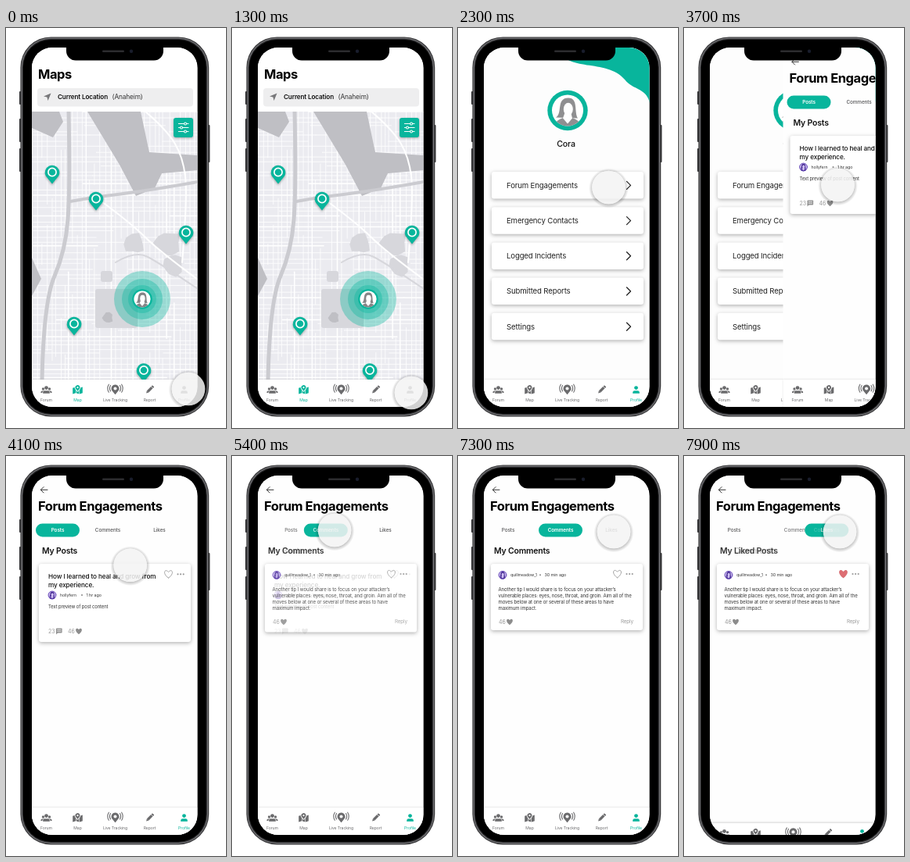
Write an HTML page with a canvas that moves like this. It is 281 px wide and 512 px high and loops after 8000 ms.

```html
<!DOCTYPE html>
<html lang="en">
<head>
<meta charset="utf-8">
<title>Safety app walkthrough</title>
<style>
html, body { margin: 0; width: 100%; height: 100%; overflow: hidden; background: #fff; }
canvas { display: block; width: 281px; height: 512px; }
</style>
</head>
<body>
<canvas id="stage"></canvas>
<script>
const W = 281, H = 512, LOOP = 8000;
const GREEN = '#08b59c', GRAY = '#6b6b6d', PALE = '#999', INK = '#111', BODY = '#333';
const FONT = 'Inter, "Liberation Sans", sans-serif';
const LEFT = 33, TOP = 25, WIDE = 211.5, TALL = 460, MAP_TOP = 107, BAR_TOP = 450;
const dpr = Math.max(1, window.devicePixelRatio || 1);

function prepare(canvas) {
  canvas.width = W * dpr;
  canvas.height = H * dpr;
  const g = canvas.getContext('2d');
  g.scale(dpr, dpr);
  return g;
}
const main = prepare(document.getElementById('stage'));
let c = main;

// ---- helpers ----
const mix = (a, b, p) => a + (b - a) * p;
const span = (t, a, length) => Math.max(0, Math.min(1, (t - a) / length));
const smooth = p => p * p * (3 - 2 * p);
const easeOut = p => 1 - (1 - p) * (1 - p);

let seed = 11;
function rand(a = 0, b = 1) {
  seed = (seed * 16807) % 2147483647;
  return mix(a, b, seed / 2147483647);
}

function scoped(draw) { c.save(); draw(); c.restore(); }
function fade(alpha, draw) {
  if (alpha <= 0) return;
  scoped(() => { c.globalAlpha *= alpha; draw(); });
}
function at(x, y, draw) { scoped(() => { c.translate(x, y); draw(); }); }
function rr(x, y, w, h, r, color) {
  c.beginPath();
  c.roundRect(x, y, w, h, r);
  c.fillStyle = color;
  c.fill();
}
function disc(x, y, r, color, stretch = 1) {
  c.beginPath();
  c.ellipse(x, y, r, r * stretch, 0, 0, Math.PI * 2);
  c.fillStyle = color;
  c.fill();
}
function stroke(color, width) {
  c.strokeStyle = color;
  c.lineWidth = width;
  c.lineCap = c.lineJoin = 'round';
  c.stroke();
}
function arc(x, y, r, a, b, width, color) {
  c.beginPath();
  c.arc(x, y, r, a, b);
  stroke(color, width);
}
const ring = (x, y, r, width, color) => arc(x, y, r, 0, Math.PI * 2, width, color);
function trace(pts) {
  c.beginPath();
  for (let i = 0; i < pts.length; i += 2) c.lineTo(pts[i], pts[i + 1]);
}
function poly(color, ...pts) { trace(pts); c.fillStyle = color; c.fill(); }
function line(color, width, ...pts) { trace(pts); stroke(color, width); }
// Smooth road through a few key points.
function road(color, width, ...p) {
  c.beginPath();
  c.moveTo(p[0], p[1]);
  let i = 2;
  for (; i < p.length - 4; i += 2) {
    c.quadraticCurveTo(p[i], p[i + 1], (p[i] + p[i + 2]) / 2, (p[i + 1] + p[i + 3]) / 2);
  }
  c.quadraticCurveTo(p[i], p[i + 1], p[i + 2], p[i + 3]);
  stroke(color, width);
}
function shadow(color, blur, dy) {
  c.shadowColor = color;
  c.shadowBlur = blur * dpr;
  c.shadowOffsetY = dy * dpr;
}
function text(s, x, y, size, { weight = 400, color = INK, align = 'left', track = -0.015 } = {}) {
  c.font = `${weight} ${size}px ${FONT}`;
  c.letterSpacing = track * size + 'px';
  c.textAlign = align;
  c.fillStyle = color;
  c.fillText(s, x, y);
}
const title = (s, y) => text(s, 41, y, 16.5, { weight: 700, color: '#000', track: -0.027 });
const page = color => rr(LEFT, TOP, WIDE, TALL, 0, color);

// ---- small drawings ----
function woman(x, y, r, hair, skin) {
  at(x, y, () => {
    disc(0, 0, r, skin);
    c.clip();
    c.scale(r, r);
    c.beginPath();
    c.moveTo(-0.75, 0.45);
    c.bezierCurveTo(-0.3, 0.2, -0.75, -0.8, 0.05, -0.8);
    c.bezierCurveTo(0.7, -0.8, 0.4, 0.1, 0.65, 0.5);
    c.fillStyle = hair;
    c.fill();
    disc(0, 1.05, 0.85, hair, 0.7);
    disc(0.04, -0.08, 0.3, skin, 1.35);
    poly(skin, -0.16, 0.1, 0.2, 0.1, 0.3, 0.5, 0, 0.85, -0.3, 0.5);
  });
}
function heart(x, y, s, color, filled) {
  at(x, y, () => {
    c.scale(s, s);
    c.beginPath();
    c.moveTo(0, 0.9);
    c.bezierCurveTo(-1.6, -0.2, -0.8, -1.5, 0, -0.5);
    c.bezierCurveTo(0.8, -1.5, 1.6, -0.2, 0, 0.9);
    c.fillStyle = color;
    filled ? c.fill() : stroke(color, 0.9 / s);
  });
}
function drop(x, y, r, color) {
  c.beginPath();
  c.arc(x, y, r, Math.PI * 0.85, Math.PI * 2.15);
  c.lineTo(x, y + r * 1.55);
  c.fillStyle = color;
  c.fill();
}
function pin(x, y) {
  scoped(() => { shadow('rgba(0,0,0,.3)', 3, 1.5); drop(x, y, 9.3, GREEN); });
  ring(x, y - 0.5, 5.1, 1.7, '#fff');
}
function person(x, y, s, color) {
  disc(x, y - s, s, color);
  rr(x - 1.8 * s, y + s / 2, 3.6 * s, 1.5 * s, [s, s, 0, 0], color);
}

// ---- tab bar ----
const icons = {
  Forum(k) {
    for (const x of [-4, 4]) person(x, 0.6, 1.7, k);
    person(0, 0, 2.9, '#fff');
    person(0, 0, 2.4, k);
  },
  Map(k) {
    for (const i of [-1, 0, 1]) {
      at(i * 4.4, 1, () => {
        c.transform(1, i ? -0.35 : 0.35, 0, 1, 0, 0);
        rr(-1.9, -3.8, 3.8, 7.6, 0, k);
      });
    }
    drop(0, -2.8, 3.8, '#fff');
    drop(0, -2.8, 3, k);
    disc(0, -2.8, 1.1, '#fff');
  },
  'Live Tracking'(k) {
    drop(0, -1.5, 5, k);
    disc(0, -1.5, 2, '#fff');
    for (const r of [7, 9.6]) {
      for (const a of [0, Math.PI]) arc(0, -1.8, r, a - 0.55, a + 0.55, 1.1, k);
    }
  },
  Report(k) {
    c.rotate(Math.PI / 4);
    rr(-1.7, -6.6, 3.4, 2, 0.7, k);
    rr(-1.7, -4, 3.4, 7.4, 0, k);
    poly(k, -1.7, 3.4, 1.7, 3.4, 0, 6.2);
  },
  Profile(k) { person(0, 0, 2.4, k); }
};
function tabBar(active, dy = 0) {
  at(0, dy, () => {
    scoped(() => { shadow('rgba(0,0,0,.2)', 2, -0.5); rr(LEFT, BAR_TOP, WIDE, 40, 0, '#fff'); });
    Object.keys(icons).forEach((name, i) => {
      const x = 51.5 + i * 44 - (i === 1 ? 4 : 0);
      const k = name === active ? GREEN : GRAY;
      at(x, 463, () => icons[name](k));
      text(name, x, 478, 5.1, { color: k, align: 'center' });
    });
  });
}

// ---- map page ----
function streets() {
  const avenue = (reach, draw) => {
    const width = rand() < 0.2 ? 1.5 : 0.8;
    for (let a = 0; a < reach;) {
      const b = a + rand(25, 90);
      if (rand() < 0.8) draw(a, b, width);
      a = b;
    }
  };
  for (let x = LEFT; x < LEFT + WIDE; x += rand(4, 8)) {
    avenue(345, (a, b, w) => line('#fff', w, x, MAP_TOP + a, x, MAP_TOP + b));
  }
  for (let y = MAP_TOP; y < BAR_TOP; y += rand(4, 9)) {
    avenue(215, (a, b, w) => line('#fff', w, LEFT + a, y, LEFT + b, y));
  }
}
function blob(x, y, r, color, n = 10) {
  const pts = [];
  for (let i = 0; i < n; i++) {
    const a = i / n * Math.PI * 2, d = r * rand(0.65, 1.2);
    pts.push(x + d * Math.cos(a), y + d * Math.sin(a));
  }
  poly(color, ...pts);
}
function cityMap() {
  const water = '#bfbfc4', park = '#d7d7dc', highway = '#cbcbd0';
  rr(LEFT, MAP_TOP, WIDE, BAR_TOP - MAP_TOP, 0, '#ebebf0');
  c.clip();
  streets();
  poly(water, 104, 107, 172, 107, 183, 159, 245, 163, 245, 182, 199, 186, 190, 205, 166, 215, 145, 175);
  poly(water, 33, 107, 68, 107, 73, 120, 60, 140, 33, 128);
  poly(water, 33, 294, 45, 321, 33, 343);
  rr(114, 334, 54, 50, 3, park);
  rr(121, 311, 15, 14, 3, park);
  blob(130, 371, 7, water);
  blob(165, 277, 13, park);
  blob(206, 275, 17, park);
  blob(212, 303, 15, park);
  road('#fff', 2, 118, 219, 160, 250, 195, 285, 245, 322);
  road('#fff', 2, 178, 107, 205, 130, 226, 165, 232, 215, 225, 300);
  road(park, 2, 140, 300, 165, 285, 195, 300, 245, 334);
  road(highway, 4, 82, 222, 115, 216, 170, 210, 245, 197);
  road(highway, 5, 80, 107, 82, 205, 76, 285, 48, 350, 46, 451);
}
function filterButton() {
  scoped(() => { shadow('rgba(0,0,0,.3)', 3, 1); rr(214, 115, 25, 25, 3, GREEN); });
  for (const i of [-1, 0, 1]) {
    const x = i ? 229 : 224, y = 127.5 + i * 5;
    line('#fff', 1, 220, y, 233, y);
    disc(x, y, 2, '#fff');
    disc(x, y, 1, GREEN);
  }
}
function mapPage() {
  page('#fff');
  title('Maps', 65);
  rr(40, 77, 199, 23.5, 4, '#eeeeef');
  poly('#77777a', 57.5, 83.5, 53.6, 93, 52.4, 88.6, 48, 87.4);
  text('Current Location', 66, 91.2, 8.15, { weight: 600 });
  text('(Anaheim)', 135.5, 91.2, 8.3, { color: BODY });
  scoped(cityMap);
  for (const r of [36, 26, 18]) disc(174, 347, r, 'rgba(8,181,156,.36)');
  disc(174, 347, 12.8, GREEN);
  woman(174, 347, 10.6, '#858587', '#fff');
  pin(59, 185);
  pin(115, 219);
  pin(230, 262);
  pin(87, 379);
  pin(176, 438.5);
  filterButton();
  tabBar('Map');
}

// ---- profile page ----
function card(x, y, w, h) {
  scoped(() => { shadow('rgba(0,0,0,.3)', 5, 1.5); rr(x, y, w, h, 3, '#fff'); });
}
function profilePage() {
  page('#fdfdfd');
  c.beginPath();
  c.moveTo(130, TOP);
  c.bezierCurveTo(135, 58, 190, 38, 213, 66);
  c.bezierCurveTo(224, 80, 240, 76, 245, 96);
  c.lineTo(245, TOP);
  c.fillStyle = GREEN;
  c.fill();
  disc(140, 105.5, 25.7, GREEN);
  woman(140, 105.5, 20, '#8f8f91', '#fff');
  text('Cora', 138, 152, 10.6, { weight: 500, align: 'center' });
  ['Forum Engagements', 'Emergency Contacts', 'Logged Incidents', 'Submitted Reports', 'Settings'].forEach((s, i) => {
    const y = 184 + i * 45.2, mid = y + 17.4;
    card(43, y, 194, 34.5);
    text(s, 62, mid + 3.3, 9.6, { color: '#222' });
    line('#222', 1.3, 215.5, mid - 5, 220.5, mid, 215.5, mid + 5);
  });
  tabBar('Profile');
}

// ---- forum page ----
const tabs = ['Posts', 'Comments', 'Likes'];
const heads = ['My Posts', 'My Comments', 'My Liked Posts'];
const pillX = i => 66 + i * 65;
const labelX = i => 64 + i * 66;

function pillTabs(from, to, p) {
  const x = mix(pillX(from), pillX(to), p);
  const label = (s, x, color, weight) =>
    text(s, x, 97.3, 6.4, { weight, color, align: 'center' });
  const plain = (i, x) => label(tabs[i], x, '#58585a', 500);
  tabs.forEach((s, i) => {
    if (i !== from && i !== to) plain(i, labelX(i));
  });
  fade(p, () => plain(from, mix(labelX(to), labelX(from), p)));
  fade(1 - p, () => plain(to, labelX(to)));
  rr(x - 28, 86.5, 56, 17, 8.5, GREEN);
  fade(1 - p, () => label(tabs[from], x, '#fff', 600));
  fade(p, () => label(tabs[to], x, '#fff', 600));
}
function byline(x, y, name, dotX, when) {
  woman(x, y, 5.3, '#4a2f96', '#cfc0f2');
  ring(x, y, 4.9, 0.9, '#5d3fb0');
  text(name, x + 10, y + 1.9, 5.2, { color: BODY });
  disc(dotX, y, 1, '#888');
  text(when, dotX + 5.5, y + 1.9, 5.4, { color: BODY });
}
function likes(x, y) {
  text('46', x, y, 7, { color: PALE });
  heart(x + 14, y - 2.3, 4.2, '#8c8c8c', true);
}
function actions(x, y, liked) {
  fade(1 - liked, () => heart(x, y, 5.4, PALE));
  fade(liked, () => heart(x, y, 5.8, '#d4484e', true));
  for (let i = 0; i < 3; i++) disc(x + 12 + i * 3.6, y, 1.1, PALE);
}
function post() {
  ['How I learned to heal and grow from', 'my experience.'].forEach((s, i) =>
    text(s, 54, 157 + i * 10.5, 8.2, { weight: 500 }));
  byline(59, 178, 'hollyfern', 97, '1 hr ago');
  text('Text preview of post content', 54, 194.5, 5.85, { color: BODY });
  text('23', 54, 226.7, 7, { color: PALE });
  rr(64, 220.5, 7.6, 6, 0.8, '#929292');
  poly('#929292', 64, 225, 66.5, 226, 64, 228.4);
  for (const y of [222.3, 224.3]) line('#fff', 0.7, 65.6, y, 70, y);
  likes(79, 226.7);
  actions(207.5, 151.3, 0);
}
function comment(liked) {
  byline(57, 152.3, 'quillmeadow_1', 105, '30 min ago');
  ['Another tip I would share is to focus on your attacker’s',
   'vulnerable places: eyes, nose, throat, and groin. Aim all of the',
   'moves below at one or several of these areas to have',
   'maximum impact.'].forEach((s, i) => text(s, 51.5, 172.6 + i * 8.1, 6.05, { color: BODY }));
  likes(52, 214.7);
  text('Reply', 224, 214.3, 6.3, { color: PALE, align: 'right' });
  actions(203.5, 151, liked);
}
function forumPage(toComments, toLikes) {
  page('#fefefe');
  line('#333', 1, 53, 43.3, 44.5, 43.3);
  line('#333', 1, 48, 39.6, 44.3, 43.3, 48, 47);
  title('Forum Engagements', 70);
  const from = toLikes > 0 ? 1 : 0, to = from + 1;
  const p = toLikes || toComments;
  const heading = i => text(heads[i], 46, 125, 10.5, { weight: 600, track: -0.02 });
  pillTabs(from, to, p);
  fade(1 - p, () => heading(from));
  fade(p, () => heading(to));
  card(42, 138, 194, mix(100, 85, toComments));
  fade(1 - toComments, post);
  fade(toComments, () => comment(toLikes));
  tabBar('Profile', 25 * toLikes);
}

// ---- phone and pointer ----
function phone() {
  const frame = '#333335';
  rr(17, 81, 4, 17, 1, frame);
  for (const y of [116, 154]) rr(17, y, 4, 30, 1, frame);
  rr(257, 124, 3.4, 48, 1, frame);
  ['#38383a', '#77777a', '#29292b', '#000'].forEach((color, i) => {
    const d = i * 1.2;
    rr(18.4 + d, 11.4 + d, 240.8 - 2 * d, 486 - 2 * d, 39 - d, color);
  });
}
function notch() {
  rr(77, TOP - 2, 124, 18.5, [0, 0, 12, 12], '#000');
  rr(123, 28.5, 28, 2.6, 1.3, '#2c2c2f');
  disc(160, 29.8, 2.2, '#191d2c');
}
const MOVE = 600;
const stops = [
  { start: 200, x: 229, y: 467 },
  { start: 1680, x: 192.5, y: 204 },
  { start: 2300, x: 196.5, y: 201 },
  { start: 3770, x: pillX(1), y: 95 },
  { start: 5650, x: 203, y: 100 },
  { start: 6600, x: 199, y: 97 }
];
function pointer(t) {
  let x = 233, y = 462;
  for (const stop of stops) {
    const p = smooth(span(t, stop.start, MOVE));
    x = mix(x, stop.x, p);
    y = mix(y, stop.y, p);
  }
  const r = 21.3;
  const glow = c.createRadialGradient(x, y + 1, r - 1, x, y + 1, r + 4);
  glow.addColorStop(0, 'rgba(0,0,0,.24)');
  glow.addColorStop(1, 'rgba(0,0,0,0)');
  c.beginPath();
  c.arc(x, y, r + 5, 0, Math.PI * 2);
  c.arc(x, y, r, 0, Math.PI * 2, true);
  c.fillStyle = glow;
  c.fill();
  disc(x, y, r, 'rgba(244,244,244,.86)');
}

const mapLayer = document.createElement('canvas');
c = prepare(mapLayer);
mapPage();
c = main;

function render(t) {
  const toProfile = span(t, 1380, 400);
  const slide = easeOut(span(t, 3500, 600));
  const toComments = easeOut(span(t, 5050, 600));
  const toLikes = easeOut(span(t, 7550, 650));
  c.fillStyle = '#fff';
  c.fillRect(0, 0, W, H);
  phone();
  scoped(() => {
    rr(LEFT, TOP, WIDE, TALL, 26, '#fff');
    c.clip();
    if (toProfile > 0 && slide < 1) profilePage();
    fade(1 - toProfile, () => c.drawImage(mapLayer, 0, 0, W, H));
    if (slide > 0) at(WIDE * (1 - slide), 0, () => forumPage(toComments, toLikes));
  });
  notch();
  pointer(t);
}
function tick(now) {
  render(now % LOOP);
  requestAnimationFrame(tick);
}
requestAnimationFrame(tick);
</script>
</body>
</html>
```
